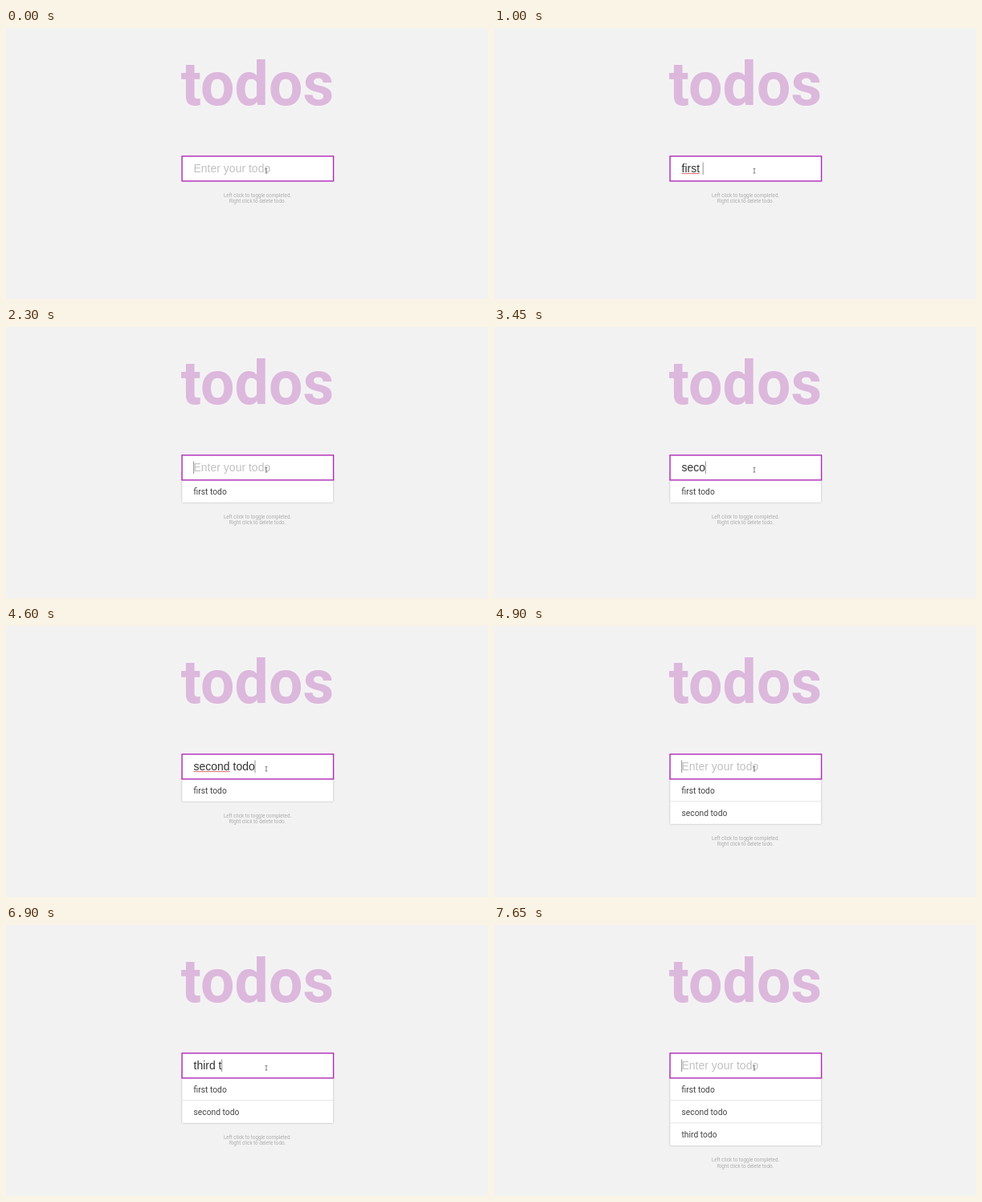
An HTML page for the animation above (8 s loop, 600 by 338 pixels).

```html
<!DOCTYPE html>
<html lang="en">
<head>
<meta charset="utf-8">
<title>todos</title>
<style>
  html, body { margin: 0; width: 100%; height: 100%; overflow: hidden; background: #f3f2f3; }
  svg { display: block; width: 600px; height: 338px; }
  text { font-family: Roboto, sans-serif; white-space: pre; }
  .title { font-size: 75.2px; font-weight: 700; fill: #dcb8dc; text-anchor: middle; }
  .field { fill: #fff; stroke: #b02ab6; stroke-width: 1.4; }
  .input { font: 14px "Liberation Sans", Arial, sans-serif; fill: #333; }
  .placeholder { fill: #c1c1c1; }
  .item { font-size: 10.3px; fill: #444; }
  .hint { font-size: 6.27px; fill: #adadad; text-anchor: middle; }
  #card { fill: #fff; filter: drop-shadow(0 .8px 1px rgba(0, 0, 0, .28)); }
  .rule { stroke: #e0e0e0; stroke-width: .8; }
  #caret { fill: #777; }
  #misspelt { stroke: #d96a6a; stroke-width: 1; }
  .pointer { fill: none; stroke: #666; stroke-width: .8; }
</style>
</head>
<body>
<svg viewBox="0 0 600 338">
  <text class="title" x="313" y="96">todos</text>
  <rect id="card" x="219.3" y="180" width="187.8"/>
  <g id="items"></g>
  <rect class="field" x="219.1" y="159.9" width="188.5" height="31"/>
  <text id="placeholder" class="input placeholder" x="233.5" y="180">Enter your todo</text>
  <line id="misspelt" x1="233.5" y1="181.6" y2="181.6"/>
  <text id="typed" class="input" x="233.5" y="180"></text>
  <rect id="caret" y="167.5" width=".8" height="15.5"/>
  <path class="pointer" d="M322.6 175.4h2.8M324 175.4v5.6M322.6 181h2.8"/>
  <g id="hint">
    <text class="hint" x="313" y="210.7">Left click to toggle completed.</text>
    <text class="hint" x="313" y="218.2">Right click to delete todo.</text>
  </g>
</svg>
<script>
  const LOOP = 8000, LEFT = 233.5, ROW = 28.15, LIST_TOP = 190.6;

  // One key time per character, then the time the todo is submitted.
  const todos = [
    { text: "first todo", keys: [150, 350, 450, 600, 800, 950, 1350, 1450, 1550, 1650], submit: 2200, underline: 1000 },
    { text: "second todo", keys: [2850, 3150, 3350, 3450, 3650, 3800, 3950, 4050, 4150, 4400, 4500], submit: 4800, underline: 4000 },
    { text: "third todo", keys: [5900, 6000, 6100, 6350, 6550, 6750, 6900, 7000, 7150, 7250], submit: 7650 }
  ];
  const caretOff = [[0, 150], [5350, 5900]];

  const el = id => document.getElementById(id);
  const show = (node, on) => node.setAttribute("visibility", on ? "visible" : "hidden");

  const rows = todos.map(({ text }, i) => {
    const row = document.createElementNS("http://www.w3.org/2000/svg", "g");
    const y = LIST_TOP + i * ROW;
    row.innerHTML = `<path class="rule" d="M219.3 ${y}H407.1"/>
      <text class="item" x="${LEFT}" y="${y + 18}">${text}</text>`;
    el("items").append(row);
    return row;
  });

  function draw(t) {
    const done = todos.filter(todo => t >= todo.submit).length;
    const current = todos[done];
    const count = current ? current.keys.filter(key => t >= key).length : 0;
    const typed = el("typed");

    typed.textContent = count ? current.text.slice(0, count) : "";
    show(el("placeholder"), !count);

    const width = count ? typed.getComputedTextLength() : 0;
    el("caret").setAttribute("x", LEFT + width - .2);
    show(el("caret"), !caretOff.some(([from, to]) => t >= from && t < to));

    const flagged = count > 0 && t >= current.underline;
    show(el("misspelt"), flagged);
    if (flagged) {
      const word = typed.getSubStringLength(0, current.text.indexOf(" "));
      el("misspelt").setAttribute("x2", LEFT + word);
    }

    rows.forEach((row, i) => show(row, i < done));
    show(el("card"), done > 0);
    el("card").setAttribute("height", LIST_TOP - 180 + done * ROW);
    el("hint").setAttribute("transform", `translate(0 ${done * ROW})`);
  }

  const start = performance.now();
  function tick() {
    draw((performance.now() - start) % LOOP);
    requestAnimationFrame(tick);
  }
  tick();
</script>
</body>
</html>
```
